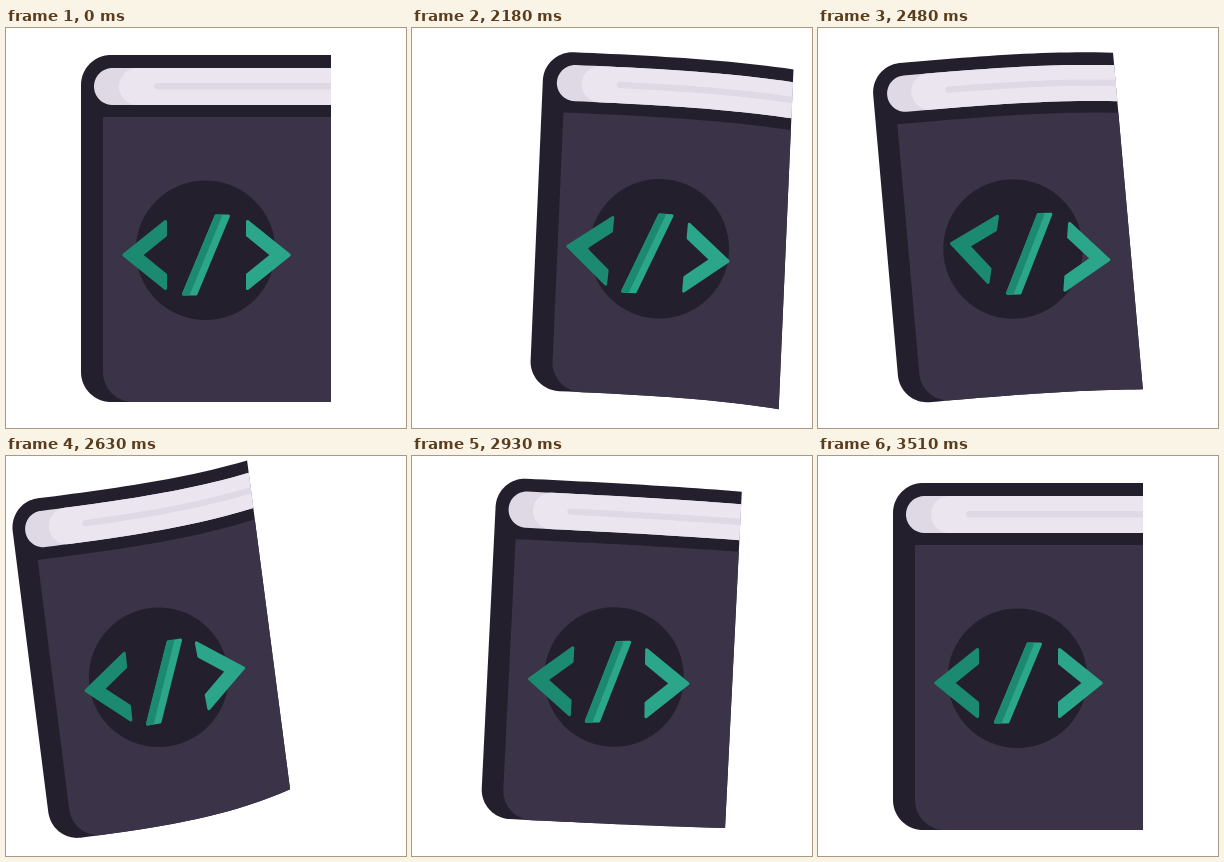
Write an HTML page with a canvas that moves like this. It is 400 by 400 pixels and loops after 3.54 s.

```html
<!DOCTYPE html>
<html lang="en">
<head>
<meta charset="utf-8">
<title>Code book</title>
<style>
  html, body { margin: 0; width: 100%; height: 100%; overflow: hidden; background: #fff; }
  canvas { display: block; width: 400px; height: 400px; }
</style>
</head>
<body>
<canvas id="stage" width="400" height="400"></canvas>
<script>
const ctx = document.getElementById('stage').getContext('2d');
const LOOP = 3540, START = 2030, END = 3510;
const LEFT = 75, TOP = 27, RIGHT = 325, WIDTH = 250, HEIGHT = 347;
const INK = '#241f2d', COVER = '#3b3348', PAGE = '#ebe5f0', PAGE_SHADE = '#dfd9e5';
const GREEN = '#2ba68a', DARK_GREEN = '#1c8a70';

// The book swings right, left, slightly right again, and settles.
const TURNS = [1980, 2260, 2630, 3000, 3470];
const BEND_LAG = 80, SIGN_LAG = 45, DISC_LAG = 10, TILT_LEAD = -30;

// Eases a value through its three peaks; soft parts follow with a lag.
function swing(time, lag, right, left, back) {
  if (time < START || time >= END) return 0;
  const stops = [0, right, left, back, 0];
  const t = Math.min(Math.max(time - lag, TURNS[0]), TURNS[4] - 1);
  const k = TURNS.findIndex(turn => turn > t) - 1;
  const s = (t - TURNS[k]) / (TURNS[k + 1] - TURNS[k]);
  return stops[k] + (stops[k + 1] - stops[k]) * (1 - Math.cos(Math.PI * s)) / 2;
}

const radians = degrees => degrees * Math.PI / 180;

function fillPath(points, color, join = 0) {
  ctx.beginPath();
  points.forEach(([x, y]) => ctx.lineTo(x, y));
  ctx.closePath();
  ctx.fillStyle = ctx.strokeStyle = color;
  ctx.fill();
  if (join) {
    ctx.lineWidth = join;
    ctx.stroke();
  }
}

// Maps a point of the flat book onto the tilted, bent one.
function bookWarp({ x: dx, y: dy, tilt, width, height, bendTop, bendBottom }) {
  const cos = Math.cos(radians(tilt)), sin = Math.sin(radians(tilt));
  return ([x, y]) => {
    const u = (x - LEFT) / WIDTH, v = (y - TOP) / HEIGHT;
    const w = u * width, h = v * height;
    const bend = (bendTop + (bendBottom - bendTop) * v) * u ** 3.4;
    return [LEFT + dx + w * cos - h * sin, TOP + dy + w * sin + h * cos + bend];
  };
}

// Band from x to the book's right edge, with rounded left corners.
function slab(warp, color, x, top, bottom, rTop, rBottom = rTop) {
  const upper = [], lower = [], n = 24;
  const corner = (r, a) => [x + r * (1 - Math.cos(a)), r * (1 - Math.sin(a))];
  for (let i = 0; i <= n; i++) {
    const a = i / n * Math.PI / 2;
    const [ux, uy] = corner(rTop, a), [lx, ly] = corner(rBottom, a);
    upper.push([ux, top + uy]);
    lower.push([lx, bottom - ly]);
  }
  for (let i = 1; i <= n; i++) {
    const along = r => x + r + (RIGHT - x - r) * i / n;
    upper.push([along(rTop), top]);
    lower.push([along(rBottom), bottom]);
  }
  fillPath([...upper, ...lower.reverse()].map(warp), color);
}

function turned(x, y, angle, draw) {
  ctx.save();
  ctx.translate(x, y);
  ctx.rotate(radians(angle));
  draw();
  ctx.restore();
}

function chevron(side, color) {
  const points = [[1, -33.5], [42.7, 0], [1, 33.5], [1, 19.6], [25.3, 0], [1, -19.6]];
  fillPath(points.map(([x, y]) => [side * x, y]), color, 3);
}

function slash() {
  fillPath([[10, -39], [22.5, -39], [-10, 39], [-22.5, 39]], GREEN, 3);
  fillPath([[10, -39], [14.5, -39], [-17.5, 39], [-22.5, 39]], DARK_GREEN, 3);
}

function drawBook(book) {
  const warp = bookWarp(book), inset = Math.max(0, book.bendTop * .15);
  slab(warp, INK, LEFT, TOP, 374, 30);
  slab(warp, COVER, 97, 89, 374, 0, 30);
  slab(warp, PAGE_SHADE, 88 + inset, 40, 77, 18.5);
  slab(warp, PAGE, 113 + inset, 40, 77, 18.5);
  slab(warp, PAGE_SHADE, 148 + inset, 55, 61.5, 3.2);
}

function draw(time) {
  const move = (lag, ...peaks) => swing(time, lag, ...peaks);
  const squash = move(0, -9.5, -5, -6.3), lift = squash / 5;

  ctx.fillStyle = '#fff';
  ctx.fillRect(0, 0, 400, 400);
  ctx.lineJoin = 'round';

  drawBook({
    x: move(0, 70, -72, 17.5),
    y: move(0, -5, 19, -8),
    tilt: move(TILT_LEAD, 2.7, -7.4, 3.1),
    width: WIDTH + move(0, -.5, -10, -4.5),
    height: HEIGHT + squash,
    bendTop: move(BEND_LAG, 19.3, -15, 11.8),
    bendBottom: move(BEND_LAG, 21.3, -27, 11.8)
  });

  ctx.beginPath();
  ctx.arc(199.5 + move(DISC_LAG, 62, -47, 8.5), 222.3 + lift, 69.8, 0, 7);
  ctx.fillStyle = INK;
  ctx.fill();

  turned(160.5 + move(SIGN_LAG, 64, -41.6, 11), 227 + move(BEND_LAG, -10.5, 5.2, -5.6),
    move(BEND_LAG, 15.6, -8.2, 8.9), () => chevron(-1, DARK_GREEN));
  turned(200 + move(SIGN_LAG, 60, -45.6, 7.5), 227 + lift,
    move(SIGN_LAG, 5.4, -9, 1), slash);
  turned(240.5 + move(SIGN_LAG, 56, -48.5, 4.2), 227 + move(BEND_LAG, 6.6, -8.7, 5),
    move(BEND_LAG, 12.2, -13.5, 8.2), () => chevron(1, GREEN));
}

function tick() {
  draw(performance.now() % LOOP);
  requestAnimationFrame(tick);
}
tick();
</script>
</body>
</html>
```
